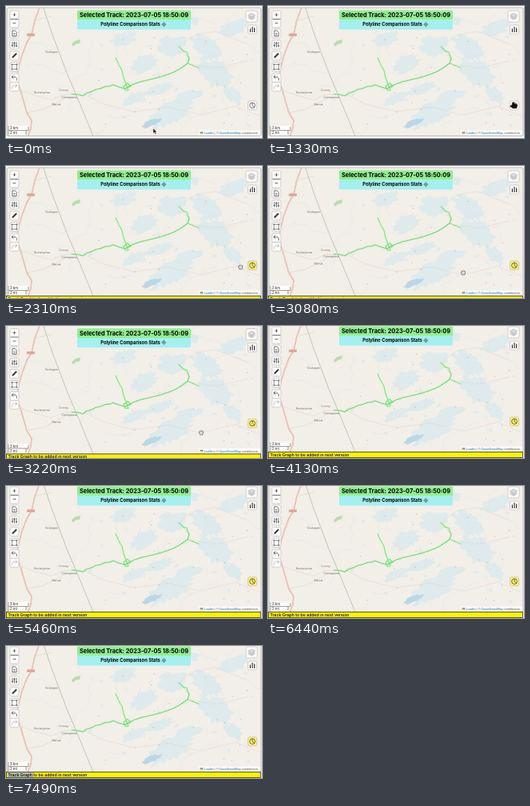
Animation of 320x166 px, one loop 7.56 s. Source, as an HTML page:

```html
<!DOCTYPE html>
<html lang="en">
<meta charset="utf-8">
<title>Track map</title>
<style>
html, body { margin: 0; width: 100%; height: 100%; overflow: hidden; background: #fff }
svg { display: block; width: 320px; height: 166px; font-family: Inter, "Liberation Sans", sans-serif }
.line { fill: none; stroke-linejoin: round; stroke-linecap: round }
.icon { fill: none; stroke: #333; stroke-width: .7; stroke-linejoin: round }
.button { fill: #fff; stroke: #c4c2be; stroke-width: .8 }
.bold { font-weight: bold; text-anchor: middle }
.place { font-size: 3.5px; fill: #77736d; text-anchor: middle }
.small { font-family: "Liberation Sans", Arial, sans-serif }
</style>
<svg viewBox="0 0 320 166">
  <defs><clipPath id="frame"><rect x="1" y="2" width="318" height="161" rx="2"/></clipPath></defs>
  <g id="page">
    <rect x="1" y="2" width="318" height="161.5" rx="2" fill="#f2eee8" stroke="#b5b4b1"/>
    <g clip-path="url(#frame)">
      <g id="water"></g>
      <path d="M82 48l4-4l7-2l-1 5l-5 1l-3 3z" fill="#b9dcab"/>
      <path class="line" d="M46 0L58 36L76 84L92 122L110 166" stroke="#b3bdac" stroke-width=".8"/>
      <g class="line" id="roads"></g>
      <g id="places"></g>
      <g class="line" stroke="#72ee70" stroke-width="1.2">
        <path d="M82 111L90 111L96 113L101 109L107 108L112 105L118 104L124 101L130 101L134 99L141 102L149 104L154 101L160 98L168 95L177 93L186 91L194 89L203 86L210 83L216 80L222 76L227 72L232 74L241 78M227 72L229 66L226 58L221 56L216 51"/>
        <path d="M137 65L141 74L145 81L147 90L151 101L153 106L149 106L147 101L152 97L156 101L151 103"/>
      </g>
      <path class="line" d="M84 111L96 113L112 105L134 99L149 104L160 98L186 91L210 83L227 72L229 66L221 56" stroke="#3f9670" stroke-width=".4" stroke-dasharray="1 2"/>
    </g>
    <rect x="89" y="5.5" width="142" height="12" rx="1.5" fill="#90ee90"/>
    <rect x="89" y="17.5" width="142" height="12" rx="1.5" fill="#a3f0f0"/>
    <text class="bold" x="160" y="14.1" font-size="7.35">Selected Track: 2023-07-05 18:50:09</text>
    <text class="bold" x="155.5" y="25.3" font-size="5.8">Polyline Comparison Stats</text>
    <path class="icon" d="M197.3 20.5l2.5 2.7l-2.5 2.7l-2.5-2.7zM197.3 21v4.4M195 23.2h4.6" style="stroke-width:.5"/>
    <g id="controls"></g>
    <g id="clock" fill="#fff">
      <rect class="button" x="302.5" y="119.5" width="11" height="11" rx="1.7" style="fill:inherit"/>
      <circle class="icon" cx="308" cy="125" r="3.4"/>
      <path class="icon" d="M308 121.6V125L310.4 127.4"/>
    </g>
    <rect x="3" y="150.5" width="25" height="6" fill="#fff" fill-opacity=".75"/>
    <rect x="3" y="156.5" width="22" height="6" fill="#fff" fill-opacity=".75"/>
    <path class="icon" d="M3 151v11.5M3 156.5h25M28 152v4.5M25 156.5v5" style="stroke:#777"/>
    <g class="small" font-size="4.6" fill="#333"><text x="5" y="155.3">3 km</text><text x="5" y="161.3">2 mi</text></g>
    <rect x="241" y="156.5" width="77" height="6" fill="#fff" fill-opacity=".8"/>
    <path d="M242.5 158.3h4v1.5h-4z" fill="#4c7be1"/><path d="M242.5 159.8h4v1.5h-4z" fill="#ffd500"/>
    <text class="small" x="248" y="161.3" font-size="3.85" fill="#555"><tspan fill="#0078a8">Leaflet</tspan> | © <tspan fill="#0078a8">OpenStreetMap</tspan> contributors</text>
    <g id="notice">
      <rect x=".5" y="163.5" width="318" height="7" fill="#fff200" stroke="#333" stroke-width=".8"/>
      <rect id="selection" x="2" y="164" height="6" fill="#b5bda5"/>
      <text x="2.5" y="169" font-size="5.2" font-weight="500">Track Graph to be added in next version</text>
    </g>
  </g>
  <g id="cursor" fill="#111">
    <path id="arrow" stroke="#fff" stroke-width=".4" d="M0-3v6.2l1.5-1.4l1.1 2.4l1.1-.5l-1.1-2.3h2z"/>
    <path id="hand" d="M-1.5-3.8q1.2-1 2 0l.4 1.6l3 .7q1.3.4.9 1.8l-.9 3.4h-5l-3.5-2.5q-.3-1.5 2.3-1.2z"/>
    <path id="grab" fill="#ddd" stroke="#444" stroke-width=".6" d="M-2-1.8q1-.9 1.4 0q1-.9 1.4 0q1.4-.8 1.6.8v2l-.8 1.8h-3l-1.4-2.6q0-1.1.8-.8z"/>
  </g>
</svg>
<script>
const $ = id => document.getElementById(id);
const add = (id, markup) => $(id).insertAdjacentHTML('beforeend', markup);

let seed = 17;
const random = () => (seed = seed * 16807 % 2147483647) / 2147483647;

// Ragged shoreline around an ellipse
function lake(x, y, rx, ry, tilt = 0, fill = '#deeaec') {
  const n = 10 + Math.round(rx), points = [];
  for (let i = 0; i < n; i++) {
    const a = i / n * 2 * Math.PI, r = .7 + random() * .45;
    const u = Math.cos(a) * rx * r, v = Math.sin(a) * ry * r;
    points.push([x + u * Math.cos(tilt) - v * Math.sin(tilt), y + u * Math.sin(tilt) + v * Math.cos(tilt)].map(p => p.toFixed(1)));
  }
  add('water', `<path d="M${points.join('L')}z" fill="${fill}"/>`);
}

function stream(x, y, angle, steps) {
  let d = `M${x} ${y}`;
  for (let i = 0; i < steps; i++) {
    const a = angle + (random() - .5) * 1.7;
    d += `l${(Math.cos(a) * 4).toFixed(1)} ${(Math.sin(a) * 4).toFixed(1)}`;
  }
  add('water', `<path class="line" d="${d}" stroke="#d8e4e7" stroke-width=".4"/>`);
}

[[147, 41, 17, 9, -.2], [172, 72, 19, 11, -.5], [208, 50, 20, 13, -.3], [250, 52, 22, 14, .6],
 [262, 86, 26, 16, .6], [284, 28, 20, 10, -.3], [232, 18, 10, 6, .4], [205, 135, 32, 14, -.5],
 [228, 114, 18, 8, -.3], [160, 117, 18, 6, -.4], [192, 104, 18, 6, -.3], [283, 112, 14, 8, .6]]
  .forEach(l => lake(...l));
lake(182, 147, 14, 4, -.4, '#bad7e5');
for (let i = 0; i < 25; i++) lake(100 + random() * 212, 10 + random() * 145, 1 + random() * 3, 1 + random(), random() * 3);
for (let i = 0; i < 28; i++) stream(20 + random() * 280, 8 + random() * 145, random() * 6.3, 6 + random() * 8);

const road = (d, color, width) => add('roads', `<path d="${d}" stroke="${color}" stroke-width="${width}"/>`);
const mainRoad = 'M42 2L36 18L32 36L26 46L20 62L15 80L14 95L18 106L22 120L26 134L32 144L31 154L27 165';
road(mainRoad, '#dfae9e', 1.5);
road(mainRoad, '#f3cfbf', .8);
road('M18 106L38 113L57 118L70 112L83 111M36 18L44 16L57 13M26 134L47 130L63 122L75 115', '#ded5ca', .6);
road('M98 111L121 123L160 133L203 127L244 137L287 126L318 139M216 51L237 36L262 32L302 48M229 73L263 78L302 69', '#e0cbc4', .4);
for (let i = 0; i < 26; i++)
  add('places', `<circle cx="${100 + random() * 210}" cy="${34 + random() * 120}" r=".6" fill="#d3a79b"/>`);
add('places', '<rect x="26" y="34.5" width="10" height="3.5" rx="1" fill="#e5a597"/>');

[['Veskajarn', 57, 59], ['Huotanjansa', 45, 110], ['Corvey', 72, 107], ['Cemagausa', 79, 115.5], ['Marsia', 63, 124.5]]
  .forEach(([name, x, y]) => add('places', `<text class="place" x="${x}" y="${y}">${name}</text>`));

const button = (x, y, w, h, icon, style = '') => add('controls',
  `<rect class="button" x="${x}" y="${y}" width="${w}" height="${h}" rx="1.7"/>
   <path class="icon" transform="translate(${x + w / 2} ${y + h / 2})" d="${icon}" style="${style}"/>`);
button(5, 6, 11, 21, 'M-2-5.5h4M0-7.5v4M-2 5h4M-5 0h10');
button(5, 29, 11, 11, 'M-2.6-3.5h3.5l1.8 1.8v5.2h-5.3zM-1 0h2M-1 1.8h2');
button(5, 43, 11, 11, 'M-2.5-3.5v7M0-3.5v7M2.5-3.5v7M-3.7 1h2.4M-1.2-1.5h2.4M1.3 1.5h2.4');
button(5, 57, 11, 11, 'M-3 3l.7-2.2L2-3.5l1.3 1.3L-1 2.2z', 'fill:#333;stroke-width:.2');
button(5, 71, 11, 11, 'M-3-3h6v6h-6zM-3.6-3.6h1v1h-1zM2.6-3.6h1v1h-1zM-3.6 2.6h1v1h-1zM2.6 2.6h1v1h-1z', 'stroke-width:.5');
button(5, 85, 11, 11, 'M-1-3.5l-2.5 2.2l2.5 2.2M-3.5-1.3h4q3 .2 2.3 4.5');
button(5, 96, 11, 11, 'M1-3.5l2.5 2.2l-2.5 2.2M3.5-1.3h-4q-3 .2-2.3 4.5', 'stroke:#aaa');
button(300, 6, 14, 14, 'M0-4l4.5 2.5L0 1l-4.5-2.5zM-4.5 0L0 2.5L4.5 0M-4.5 1.7L0 4.2l4.5-2.5', 'stroke:#aaa;fill:#ddd');
button(302.5, 24, 11, 11, 'M-2.6 3.5v-4.5M0 3.5v-7M2.6 3.5v-5.5', 'stroke-width:1.2');

const ease = (t, from, to) => {
  const p = Math.min(1, Math.max(0, (t - from) / (to - from)));
  return p * p * (3 - 2 * p);
};
const show = (id, visible) => $(id).style.display = visible ? '' : 'none';

function draw(now) {
  const t = now % 7560;
  const active = t >= 1610;
  const out = ease(t, 0, 1330), back = ease(t, 2100, 2800);
  const x = 184 + 123 * out - 63 * back, y = 157 - 32 * out + 9 * back;
  $('page').setAttribute('transform', `translate(0 ${-5 * ease(t, 3080, 3360)})`);
  $('cursor').setAttribute('transform', `translate(${x} ${y})`);
  show('arrow', t < 1260);
  show('hand', t >= 1260 && t < 2170);
  show('grab', t >= 2170 && t < 3290);
  show('notice', active);
  $('clock').setAttribute('fill', active ? '#fff36b' : '#fff');
  $('selection').setAttribute('width', 32 * ease(t, 7000, 7420));
  requestAnimationFrame(draw);
}
requestAnimationFrame(draw);
</script>
</html>
```
